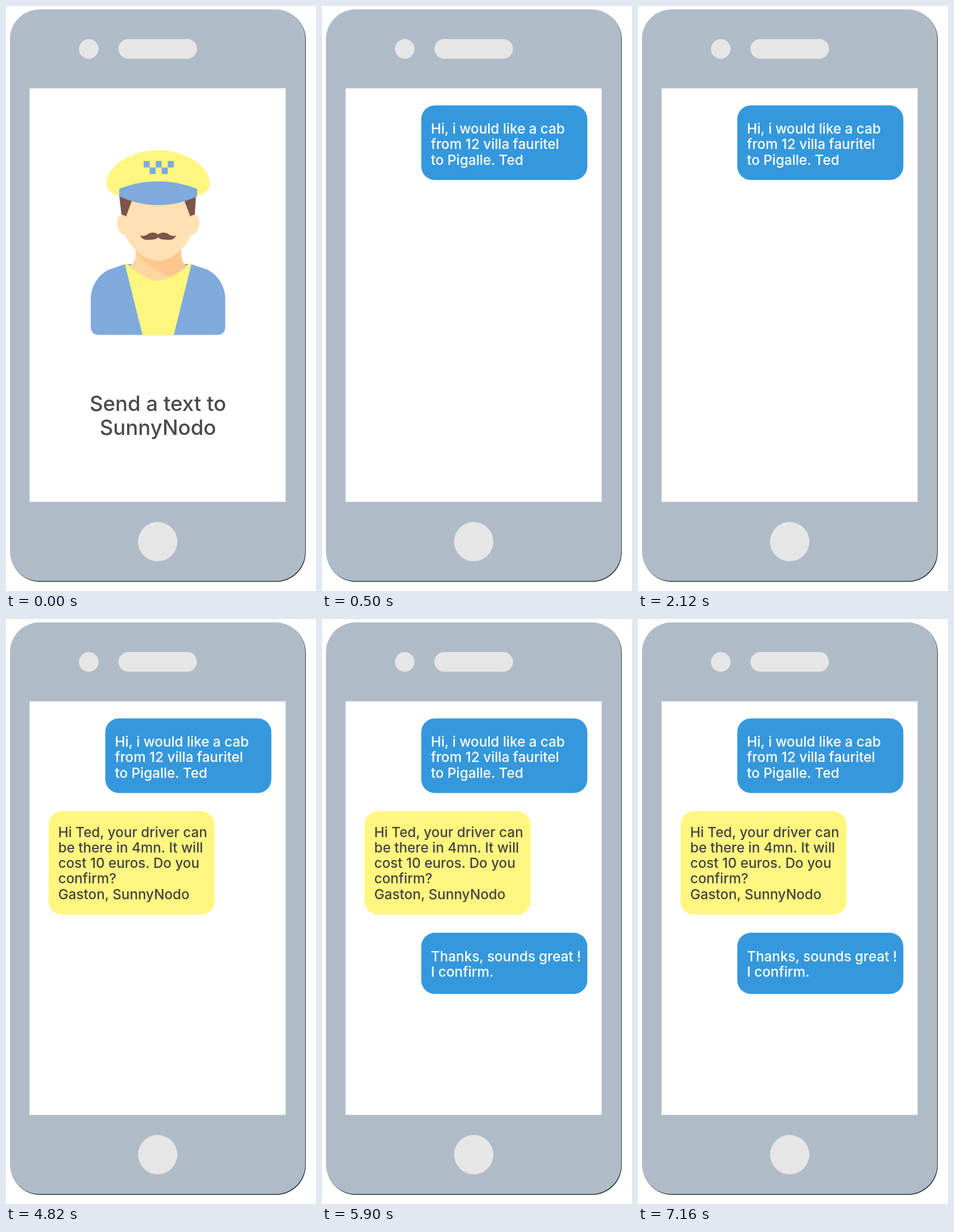
Write an HTML page that moves like this. It is 545 px wide and 1027 px high and loops after 8000 ms.

```html
<!DOCTYPE html>
<html>
<head>
<meta charset="utf-8">
<style>
  html, body { margin: 0; width: 100%; height: 100%; overflow: hidden; background: #fff; }
  svg { display: block; width: 100%; height: 100%; }
  text { font: 500 24.2px Inter, sans-serif; fill: #444; }
  .title text { font-size: 36.6px; text-anchor: middle; fill: #4a4a4a; }
  .sent rect { fill: #3598dc; }
  .sent text { fill: #fff; }
  .reply rect { fill: #fff680; }
</style>
</head>
<body>
<svg viewBox="0 0 545 1027">
  <!-- Phone -->
  <rect x="8" y="7" width="519" height="1004" rx="52" fill="#2f3940"/>
  <rect x="7" y="6" width="519" height="1003.5" rx="52" fill="#afbcc8"/>
  <rect x="41.5" y="144.5" width="450" height="726" fill="#fff"/>
  <g fill="#e6e6e6">
    <circle cx="145.5" cy="75.3" r="17.2"/>
    <rect x="197.7" y="58" width="138" height="34.5" rx="17.25"/>
    <circle cx="266.7" cy="940.3" r="34.5"/>
  </g>

  <g id="welcome" class="title">
    <!-- Clothes and neck -->
    <path fill="#7faadb" d="M210 453L182 462.500C162 471 149 492 149 515V562Q149 577.500 164 577.500H371Q385.500 577.500 385.500 562V515C385.500 492 372 471 353 462.500L325 453Z"/>
    <path fill="#fff680" d="M209 453Q212 450 217 456H318Q323 450 326 453L295 577.500H240Z"/>
    <path fill="#ffd6a1" d="M228 420V436C228 448 222 453 217 457Q247 482 267.500 482Q288 482 318 457C313 453 308 448 308 436V420Z"/>
    <path fill="#fdc78d" d="M228 432C240 450 262 466 290 475.500Q302 470 318 457C313 453 308 448 308 436V425Z"/>
    <!-- Head -->
    <path fill="#7f5449" d="M199 332L222 342L211 370L203 366ZM334 332L313 342L324 370L332 366Z"/>
    <path fill="#ffe1b3" d="M222 340L211 370C206 364 195 366 195 379C195 392 202 402 210 402C218 422 240 447 267.500 447C295 447 317 422 325 402C333 402 340 392 340 379C340 366 329 364 324 370L313 340Z"/>
    <path fill="#7f5449" d="M267.500 401C260 395.500 252 398 247 402Q241 405 236 402.500C239 409 243 411 250 410.500C258 410.500 264 410 267.500 406C271 410 277 410.500 285 410.500C292 411 296 409 299 402.500Q294 405 288 402C283 398 275 395.500 267.500 401Z"/>
    <!-- Cap -->
    <path fill="#fff680" d="M201 334C184 331 177 322 177 311C177 280 222 253 267.500 253C313 253 358 280 358 311C358 322 351 331 334 334Z"/>
    <path fill="#7faadb" d="M199 321A184 184 0 0 1 336 321V334A158 158 0 0 1 199 334Z"/>
    <path fill="#7faadb" d="M242 272h10.500v11.500h-10.500ZM263.200 272h10.500v11.500h-10.500ZM284.400 272h10.500v11.500h-10.500ZM252.500 283.500h10.700v11.500h-10.700ZM273.700 283.500h10.700v11.500h-10.700Z"/>
    <text x="267" y="711">Send a text to</text>
    <text x="267" y="752.500">SunnyNodo</text>
  </g>
  <g id="chat"></g>
</svg>
<script>
const messages = [
  { at: 500, kind: "sent", x: 174.5, y: 174.5, height: 131, baseline: 224,
    lines: ["Hi, i would like a cab", "from 12 villa fauritel", "to Pigalle. Ted"] },
  { at: 3200, kind: "reply", x: 74.7, y: 337.3, height: 181.7, baseline: 382.5,
    lines: ["Hi Ted, your driver can", "be there in 4mn. It will", "cost 10 euros. Do you", "confirm?", "Gaston, SunnyNodo"] },
  { at: 5900, kind: "sent", x: 174.5, y: 550.8, height: 107.5, baseline: 600.8,
    lines: ["Thanks, sounds great !", "I confirm."] }
];
const LOOP = 8000;
const LINE_HEIGHT = 27.3;
const welcome = document.getElementById("welcome");
const chat = document.getElementById("chat");

chat.innerHTML = messages.map(({ kind, x, y, height, baseline, lines }) =>
  `<g class="${kind}"><rect x="${x}" y="${y}" width="292" height="${height}" rx="24"/>` +
  lines.map((line, i) =>
    `<text x="${x + 17}" y="${baseline + i * LINE_HEIGHT}">${line}</text>`).join("") +
  "</g>").join("");

const show = (element, visible) => { element.style.display = visible ? "" : "none"; };

function draw(now) {
  const time = now % LOOP;
  show(welcome, time < messages[0].at);
  messages.forEach((message, i) => show(chat.children[i], time >= message.at));
  requestAnimationFrame(draw);
}
draw(performance.now());
</script>
</body>
</html>
```
